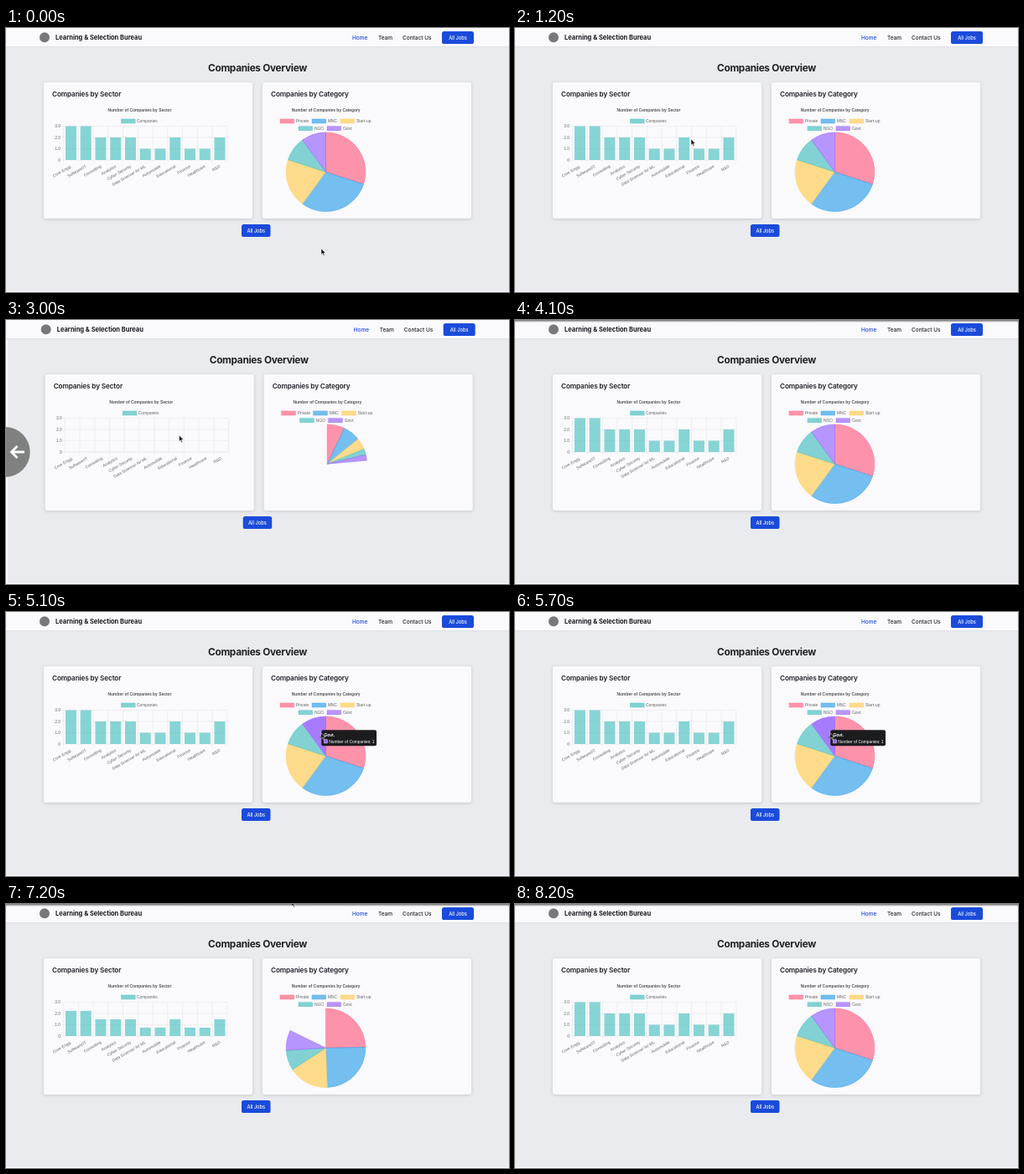
An HTML page that plays this animation: 600 by 316 pixels, repeating every 8.3 s.

```html
<!DOCTYPE html>
<html lang="en">
<head>
<meta charset="utf-8">
<title>Companies Overview</title>
<style>
html, body { margin: 0; width: 100%; height: 100%; overflow: hidden; background: #fff; }
svg { display: block; width: 600px; height: 316px; font-family: Inter, "Noto Sans", sans-serif; fill: #1f2228; }
.h1 { font-size: 11.8px; font-weight: 700; letter-spacing: -.025em; }
.h2 { font-size: 8.2px; font-weight: 600; letter-spacing: -.015em; }
.brand { font-size: 7.5px; font-weight: 700; fill: #15171c; }
.nav { font-size: 6.5px; font-weight: 500; }
.btn { font-size: 5.7px; font-weight: 500; fill: #fff; text-anchor: middle; }
.job { font-size: 6.4px; text-anchor: middle; }
.job tspan { font-weight: 600; }
.logo { font-size: 7px; font-weight: 700; letter-spacing: .7px; fill: #2b3446; }
.chart { font: 4.9px "Liberation Sans", Arial, sans-serif; fill: #666; }
.chart .t { font-weight: 700; text-anchor: middle; fill: #555; }
.mid { text-anchor: middle; }
.end { text-anchor: end; }
.card { fill: #faf9fc; filter: drop-shadow(0 1.5px 2px rgba(0, 0, 0, .14)); }
</style>
</head>
<body>
<svg id="stage" viewBox="0 0 600 316"></svg>
<script>
const LOOP = 8300;
const PINK = '#ff6384', BLUE = '#36a2eb', YELLOW = '#ffcd56', TEAL = '#4bc0c0', PURPLE = '#9966ff';
const sectors = [['Core Engg.', 3], ['Software/IT', 3], ['Consulting', 2], ['Analytics', 2],
  ['Cyber Security', 2], ['Data Science/ AI/ ML', 1], ['Automobile', 1], ['Educational', 2],
  ['Finance', 1], ['Healthcare', 1], ['R&amp;D', 2]];
// name, colour, share, legend x, legend y
const kinds = [['Private', PINK, .3, 327, 109], ['MNC', BLUE, .3, 365, 109], ['Start-up', YELLOW, .2, 399, 109],
  ['NGO', TEAL, .1, 349, 117.8], ['Govt.', PURPLE, .1, 383, 117.8]];
const BASE = 158, UNIT = 13.5, LEFT = 68.6, STEP = 17.75;

const text = (x, y, s, cls = '', more = '') => `<text x="${x}" y="${y}" class="${cls}" ${more}>${s}</text>`;
const rect = (x, y, w, h, fill, more = '') => `<rect x="${x}" y="${y}" width="${w}" height="${h}" fill="${fill}" ${more}/>`;
const line = (x1, y1, x2, y2) => `<path d="M${x1} ${y1}L${x2} ${y2}" stroke="#e3e3e6" stroke-width=".5"/>`;
const swatch = (x, y, color) => rect(x, y, 16.6, 5, color, `fill-opacity=".68" stroke="${color}" stroke-width=".4"`);
const button = (x, y, w) => rect(x, y, w, 15, '#1a4bdb', 'rx="2.6"') + text(x + w / 2, y + 9.6, 'All Jobs', 'btn');
const card = x => `<rect class="card" x="${x}" y="65" width="249" height="163" rx="2.5"/>`;

function header() {
  return rect(-4, 0, 608, 22, '#fafafc') + rect(-4, 22, 608, 1, '#dfe0e4') +
    '<circle cx="46" cy="11.3" r="6" fill="#77787b"/>' +
    text(59, 14.1, 'Learning &amp; Selection Bureau', 'brand') +
    text(413, 14, 'Home', 'nav', 'style="fill:#1d44d8"') +
    text(444, 14, 'Team', 'nav') + text(473, 14, 'Contact Us', 'nav') + button(520, 4, 38);
}

function barChart() {
  let s = text(159.5, 100, 'Number of Companies by Sector', 't') + swatch(137.5, 109, TEAL) + text(156, 113.2, 'Companies');
  for (let v = 0; v <= 3; v++) {
    const y = BASE - v * UNIT;
    s += line(LEFT - 2.5, y, LEFT + 11 * STEP, y) + text(65, y + 1.7, v ? v + '.0' : '0', 'end');
  }
  for (let i = 0; i <= 11; i++) s += line(LEFT + i * STEP, BASE - 3 * UNIT, LEFT + i * STEP, BASE + 2.5);
  sectors.forEach(([name], i) => {
    const x = LEFT + (i + .5) * STEP;
    s += rect(x - 6.5, BASE, 13, 0, TEAL, 'class="bar" fill-opacity=".65"') +
      text(0, 0, name, 'end', `transform="translate(${x + 1} 166.5) rotate(-30)"`);
  });
  return s;
}

function pieChart() {
  let s = text(381.7, 100, 'Number of Companies by Category', 't');
  for (const [name, color, , x, y] of kinds) {
    s += swatch(x, y, color) + text(x + 19, y + 4.2, name) +
      `<path class="slice" fill="${color}" fill-opacity=".68" stroke="${color}" stroke-width=".5"/>`;
  }
  return s;
}

function overview() {
  return rect(0, 0, 604, 315, '#e9ebee') + header() + text(300, 51.7, 'Companies Overview', 'h1 mid') +
    card(45) + card(306) + text(55, 82, 'Companies by Sector', 'h2') + text(316, 82, 'Companies by Category', 'h2') +
    `<g class="chart">${barChart()}${pieChart()}</g>` + button(281, 235, 34.5);
}

function jobCard(y, fields) {
  const labels = ['Company', 'Sector', 'Category', 'CTC', 'Joining Date', 'Location'];
  return rect(78.3, y + .3, 443.5, 99, '#f2f1f3', 'rx="2" stroke="#d3d3d7" stroke-width=".6"') +
    rect(87, y + 8, 84.5, 83.5, '#fbfafc') + `<circle cx="129" cy="${y + 45}" r="13.5" fill="#27406b"/>` +
    text(107.5, y + 67.5, 'COMPANY', 'logo') +
    fields.map((f, i) => text(225, y + 28.4 + i * 9.54, `<tspan>${labels[i]}:</tspan> ${f}`, 'job')).join('');
}

const jobs = (title, ...cards) => rect(0, 0, 604, 315, '#faf9fc') + header() +
  text(78, 51.7, title, 'h1') + cards.map((c, i) => jobCard(64 + i * 109, c)).join('');

document.getElementById('stage').innerHTML = `
<defs><linearGradient id="shade" x2="0" y2="1"><stop stop-color="#6d6d70"/><stop offset="1" stop-color="#6d6d70" stop-opacity="0"/></linearGradient></defs>
<g id="overview">${overview()}</g>
<g id="sector">${jobs('Jobs in Sector: Educational',
  ['QuillNest Learning', 'Educational', 'Start-up', '1200000', '2024-06-01', 'Pune'],
  ['TutorMarsh Systems', 'Educational', 'Private', '1000000', '2024-07-15', 'Mumbai'])}</g>
<g id="category">${jobs('Jobs in Category: Govt.',
  ['QuillVane Technologies', 'Core Engg., R&amp;D', 'Govt.', '2200000', '2024-03-15', 'Bengaluru'])}</g>
<g id="tip" class="chart"><path d="M374.2 150L377 147.5V152.5Z" fill="#1c1c1f"/>
${rect(376.3, 141.3, 65.7, 19, '#1c1c1f', 'rx="2"')}
${text(379.5, 148.6, 'Govt.', '', 'fill="#fff" font-weight="700"')}
${rect(379.3, 152.8, 4.2, 4.2, PURPLE, 'stroke="#fff" stroke-width=".4"')}
${text(385.2, 156.7, 'Number of Companies: 1', '', 'fill="#fff"')}</g>
<g id="back"><circle cx="-1.3" cy="158" r="30" fill="#777"/>
<path d="M22 158H7M13.5 151L6.5 158L13.5 165" fill="none" stroke="#fff" stroke-width="2.8"/></g>
<rect id="shadow" width="600" height="3" fill="url(#shade)"/>
<path id="cursor" d="M0 0V7.2L1.6 5.7 2.8 8.4 4 7.9 2.8 5.3H5.1Z" fill="#111" stroke="#fff" stroke-width=".5"/>`;

const el = id => document.getElementById(id);
const bars = document.querySelectorAll('.bar'), slices = document.querySelectorAll('.slice');
const clamp = v => Math.max(0, Math.min(1, v));
const show = (id, on) => el(id).style.display = on ? '' : 'none';
const outQuart = t => 1 - (1 - clamp(t)) ** 4;

// time, x, y
const path = [[0, 376, 264], [200, 376, 264], [1000, 210, 133], [1900, 210, 133], [2250, 216, 145], [2700, 206.5, 138],
  [3400, 206.5, 138], [3950, 190, -12], [4350, 300, -12], [4950, 375.7, 144.5], [5900, 375.7, 144.5],
  [6350, 346, 127], [6900, 346, 127], [7250, 340, -12], [LOOP, 340, -12]];

function cursorAt(t) {
  const i = path.findIndex(p => p[0] > t), [t0, x0, y0] = path[i - 1], [t1, x1, y1] = path[i];
  const u = (t - t0) / (t1 - t0), e = u * u * (3 - 2 * u);
  return [x0 + (x1 - x0) * e, y0 + (y1 - y0) * e];
}

function drawPie(p, hover) {
  const at = a => `${381.5 + 47.3 * Math.sin(a)} ${172.3 - 47.3 * Math.cos(a)}`;
  let a = 0;
  kinds.forEach(([, , share], i) => {
    const b = a + share * p * 2 * Math.PI;
    slices[i].setAttribute('d', `M381.5 172.3L${at(a)}A47.3 47.3 0 0 1 ${at(b)}Z`);
    a = b;
  });
  slices[4].setAttribute('fill-opacity', hover ? .85 : .68);
}

function drawBars(p) {
  bars.forEach((bar, i) => {
    const h = sectors[i][1] * UNIT * p;
    bar.setAttribute('y', BASE - h);
    bar.setAttribute('height', h);
  });
}

const fade = (t, a, b, c, d) => Math.min(clamp((t - a) / (b - a)), clamp((d - t) / (d - c)));

function render(t) {
  const onSector = t >= 1500 && t < 2936, onCategory = t >= 5900 && t < 6850;
  const hover = t >= 4900 && t < 5900;
  show('sector', onSector);
  show('category', onCategory);
  show('overview', !onSector && !onCategory);
  el('overview').setAttribute('transform', `translate(${t > 2936 && t < 3150 ? 1.7 : 0})`);

  const start = t < 2936 ? -2000 : t < 6850 ? 2936 : 6850;
  drawPie(outQuart((t - start) / 1000), hover);
  drawBars(outQuart((t - start - 64) / 1000));

  el('tip').style.opacity = hover ? clamp((t - 4900) / 150) : 0;
  el('back').style.opacity = .92 * Math.max(fade(t, 2800, 2930, 3100, 3300), fade(t, 6380, 6850, 6950, 7150));
  show('shadow', t >= 3900 && t < 4500 || t >= 7200);
  el('cursor').setAttribute('transform', `translate(${cursorAt(t)})`);
}

function tick() {
  render(performance.now() % LOOP);
  requestAnimationFrame(tick);
}
tick();
</script>
</body>
</html>
```
